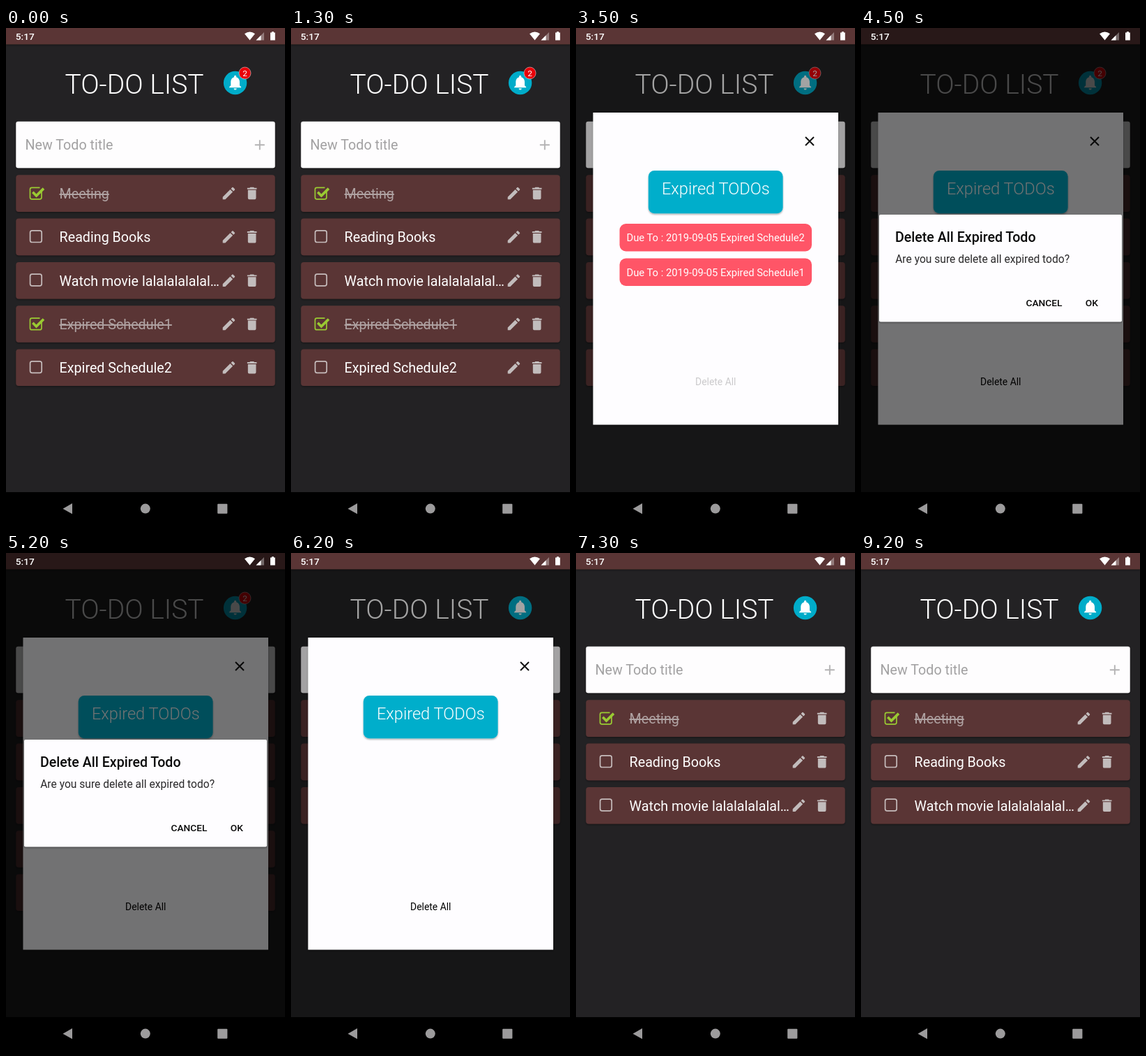
Write an HTML page that moves like this. It is 400x711 px and loops after 9300 ms.

```html
<!DOCTYPE html>
<html lang="en">
<head>
<meta charset="utf-8">
<title>To-do list</title>
<style>
html, body { margin: 0; width: 100%; height: 100%; overflow: hidden; background: #000; }
svg { display: block; width: 400px; height: 711px; font-family: Roboto, sans-serif; }
</style>
</head>
<body>
<svg viewBox="0 0 400 711">
  <defs>
    <path id="pencil" d="M3 17.25V21h3.75L17.81 9.94l-3.75-3.75zM20.71 7.04a1 1 0 0 0 0-1.41l-2.34-2.34a1 1 0 0 0-1.41 0l-1.83 1.83 3.75 3.75z"/>
    <path id="trash" d="M6 19a2 2 0 0 0 2 2h8a2 2 0 0 0 2-2V7H6zM19 4h-3.5l-1-1h-5l-1 1H5v2h14z"/>
    <path id="bell" d="M12 22a2 2 0 0 0 2-2h-4a2 2 0 0 0 2 2zm6-6v-5c0-3.07-1.64-5.64-4.5-6.32V4a1.5 1.5 0 0 0-3 0v.68C7.63 5.36 6 7.92 6 11v5l-2 2v1h16v-1z"/>
    <filter id="shadow" x="-10%" y="-10%" width="120%" height="125%">
      <feDropShadow dx="0" dy="1.5" stdDeviation="1.3" flood-color="#000" flood-opacity=".35"/>
    </filter>
  </defs>

  <rect width="400" height="711" fill="#232224"/>
  <rect width="400" height="23.3" fill="#5a3534" filter="url(#shadow)"/>
  <text x="184" y="94" font-size="39" font-weight="300" fill="#fff" text-anchor="middle">TO-DO LIST</text>
  <circle cx="328.6" cy="78.5" r="16.7" fill="#00acc9"/>
  <use href="#bell" transform="translate(315.9 65.2) scale(1.06)" fill="#fff"/>
  <g id="badge">
    <circle cx="342.5" cy="64.5" r="8.5" fill="#e80008" stroke="#fff" stroke-opacity=".6" stroke-width=".8"/>
    <text x="342.5" y="68.8" font-size="11.8" fill="#fff" text-anchor="middle">2</text>
  </g>

  <rect x="14.3" y="133.8" width="371.4" height="66.5" rx="3" fill="#fefdfe" filter="url(#shadow)"/>
  <text x="27.5" y="174" font-size="19.7" fill="#a2a1a2">New Todo title</text>
  <path d="M356.8 167.2h14M363.8 160.2v14" stroke="#b4b3b4" stroke-width="1.9"/>
  <g id="list"></g>

  <g id="modal">
    <rect y="23.3" width="400" height="641" fill="#000" opacity=".36"/>
    <rect x="24.5" y="121" width="351.5" height="446.5" fill="#fefdff" filter="url(#shadow)"/>
    <path d="M329 156l12 12M341 156l-12 12" stroke="#111" stroke-width="2"/>
    <rect x="103.8" y="204" width="192.8" height="61.2" rx="8.5" fill="#00aecb" filter="url(#shadow)"/>
    <text x="200.3" y="238" font-size="23.6" font-weight="300" fill="#fff" text-anchor="middle">Expired TODOs</text>
    <g id="due"></g>
    <text id="wipe" x="200.3" y="511" font-size="13.9" fill="#000" text-anchor="middle">Delete All</text>
  </g>

  <g id="alert">
    <rect width="400" height="664" fill="#000" opacity=".55"/>
    <rect x="26" y="267" width="348" height="153.3" rx="2" fill="#fefdff" filter="url(#shadow)"/>
    <text x="49" y="305.5" font-size="19.6" font-weight="500" fill="#0a0a0a">Delete All Expired Todo</text>
    <text x="49.2" y="335.5" font-size="15.6" fill="#2a292a">Are you sure delete all expired todo?</text>
    <g font-size="13.7" font-weight="500" fill="#0a0a0a">
      <text x="236.5" y="398.3">CANCEL</text>
      <text x="321.7" y="398.3">OK</text>
    </g>
  </g>

  <text x="13.8" y="17.2" font-size="13.7" font-weight="500" fill="#fff">5:17</text>
  <g fill="#fff">
    <path d="M342 8.3Q349.5 2.8 357 8.3L349.5 17.6z"/>
    <path d="M370 6v11.5h-11.5z" opacity=".35"/>
    <path d="M365.5 10.5v7h-7z"/>
    <path d="M381 5.3h3v1.3h1.8v11h-6.8v-11h2z"/>
  </g>

  <rect y="664" width="400" height="47" fill="#000"/>
  <g fill="#9c9b9c">
    <path d="M81.5 687.7l13.5-7.6v15.2z"/>
    <circle cx="199.8" cy="687.6" r="7"/>
    <rect x="303.2" y="680.8" width="14.2" height="14" rx="1"/>
  </g>
</svg>
<script>
const LOOP = 9300, STEP = 100;
const el = id => document.getElementById(id);
const ramp = (t, from, to) => Math.min(1, Math.max(0, (t - from) / (to - from)));
const pulse = (t, a, b, c, d) => ramp(t, a, b) - ramp(t, c, d);

const todos = [
  ["Meeting", true],
  ["Reading Books", false],
  ["Watch movie lalalalalalal…", false],
  ["Expired Schedule1", true],
  ["Expired Schedule2", false]
];

function box(done) {
  return done
    ? `<g fill="none" stroke="#9acb32"><path d="M51 20.5V32a2.5 2.5 0 0 1-2.5 2.5h-11.500a2.500 2.500 0 0 1-2.500-2.500v-11.500a2.500 2.500 0 0 1 2.500-2.500h11.500" stroke-width="1.700"/>
       <path d="M38.300 24.500l5.200 5.200L54 19.300" stroke-width="3.600"/></g>`
    : `<rect x="34.600" y="17.300" width="16.600" height="16.600" rx="2.800" fill="none" stroke="#c6bcbc" stroke-width="1.700"/>`;
}

function card([title, done], i) {
  const ink = done ? 'fill="#b0a3a3" text-decoration="line-through"' : 'fill="#fff"';
  return `<g class="${i > 2 ? "expired" : "kept"}" transform="translate(0 ${210.3 + 62.3 * i})">
    <rect x="14.3" width="371.4" height="52.6" rx="4" fill="#5a3534" filter="url(#shadow)"/>
    ${box(done)}
    <text x="76.600" y="33.700" font-size="19.700" ${ink}>${title}</text>
    <g fill="#c2bcbc">
      <use href="#pencil" transform="translate(307.800 14.600) scale(.972)"/>
      <use href="#trash" transform="translate(341 14.600) scale(.972)"/>
    </g></g>`;
}

function dueRow(n, i) {
  const y = 280 + 49.5 * i;
  return `<rect x="62.5" y="${y}" width="275.500" height="39.500" rx="9" fill="#ff5567"/>
    <text x="200.200" y="${y + 25.4}" font-size="14.750" fill="#fff" text-anchor="middle">Due To : 2019-09-05 Expired Schedule${n}</text>`;
}

el("list").innerHTML = todos.map(card).join("");
el("due").innerHTML = [2, 1].map(dueRow).join("");
const expired = [el("badge"), el("due"), ...document.querySelectorAll(".expired")];

function fade(id, value) {
  el(id).setAttribute("opacity", value);
  el(id).style.display = value > 0 ? "" : "none";
}

function draw(time) {
  const t = Math.floor(time % LOOP / STEP) * STEP;
  fade("modal", pulse(t, 1950, 2145, 7000, 7250));
  fade("alert", pulse(t, 3600, 3800, 5400, 5600));
  fade("wipe", 1 - 0.8 * pulse(t, 3350, 3500, 3550, 3800));
  for (const node of expired) node.style.display = t < 5600 ? "" : "none";
}

const start = performance.now();
function tick() {
  draw(performance.now() - start);
  requestAnimationFrame(tick);
}
tick();
</script>
</body>
</html>
```
